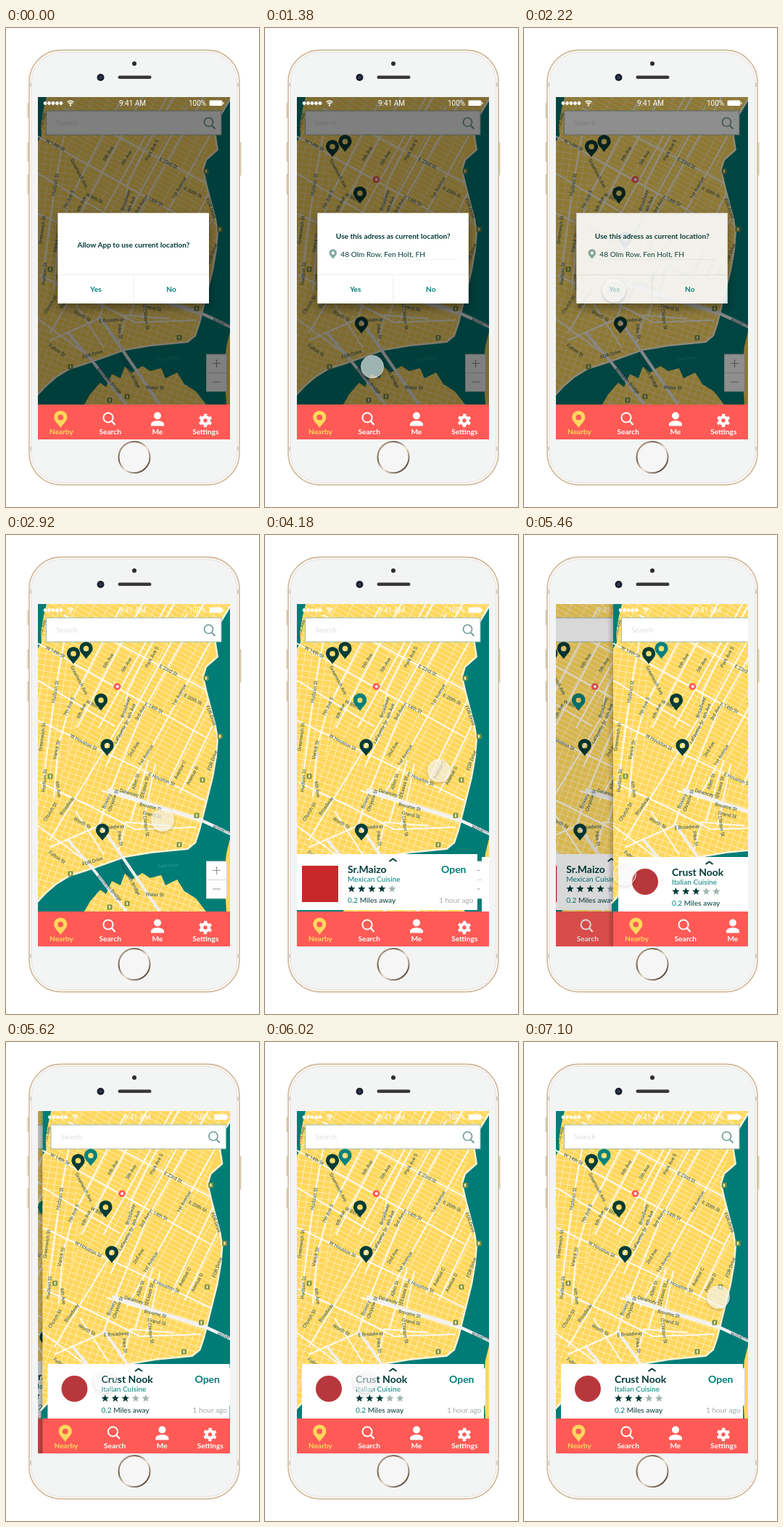
An HTML page that plays this animation: 349 by 659 pixels, repeating every 7.12 s.

```html
<!DOCTYPE html>
<html lang="en">
<head>
<meta charset="utf-8">
<title>Nearby food app</title>
<style>
  html, body { margin: 0; width: 100%; height: 100%; overflow: hidden; background: #fff; }
  svg { display: block; width: 100vw; height: 100vh; }
  text { font: 400 10.15px Lato, sans-serif; }
  .bold { font-weight: 700; }
  .title { font-weight: 700; font-size: 14px; }
  .mid { text-anchor: middle; }
  .street { font: 400 6.7px Roboto, sans-serif; fill: #27505a; text-anchor: middle; }
  .status { font: 400 10px Roboto, "Liberation Sans", sans-serif; fill: #fff; }
  .dark { fill: #003b38; }
  .teal { fill: #007f7a; }
  .road { fill: none; stroke: #fffaf0; stroke-linejoin: round; }
</style>
</head>
<body>
<svg id="stage" viewBox="0 0 349 659" xmlns="http://www.w3.org/2000/svg"></svg>
<script>
const LOOP = 7120;
const YELLOW = '#ffd75c', WATER = '#007c77', DARK = '#003b38', TEAL = '#00827d', RED = '#ff5a56';

const text = (x, y, s, cls = '', extra = '') => `<text x="${x}" y="${y}" class="${cls}" ${extra}>${s}</text>`;
const rect = (x, y, w, h, fill, extra = '') => `<rect x="${x}" y="${y}" width="${w}" height="${h}" fill="${fill}" ${extra}/>`;
const circle = (x, y, r, fill, extra = '') => `<circle cx="${x}" cy="${y}" r="${r}" fill="${fill}" ${extra}/>`;
const line = (d, stroke, width, extra = '') => `<path d="${d}" fill="none" stroke="${stroke}" stroke-width="${width}" ${extra}/>`;

const PIN = 'M0 14C-3 9-9.5 5-9.5-1A9.5 9.5 0 1 1 9.5-1C9.5 5 3 9 0 14ZM4-.8A4 4 0 1 0-4-.8A4 4 0 1 0 4-.8Z';
const pin = (x, y, fill, scale = 0.96) =>
  `<path d="${PIN}" fill="${fill}" fill-rule="evenodd" transform="translate(${x} ${y}) scale(${scale})"/>`;

const star = (x, y, fill) => {
  const points = Array.from({ length: 10 }, (_, i) => {
    const r = i % 2 ? 2.3 : 5.5, a = i * Math.PI / 5;
    return `${(x + r * Math.sin(a)).toFixed(1)},${(y - r * Math.cos(a)).toFixed(1)}`;
  });
  return `<polygon points="${points.join(' ')}" fill="${fill}"/>`;
};

// Map: land, water, street grids, main roads and labels
const SHORE = 'M310 99L296 122L290 148L293 168L277 182L273 195L278 217L284 240L290 262L293 281L291 305L286 334L275 378L268 406L262 424L251 433L200 438L164 444L136 454L110 463L88 470L70 481L56 493L42 508';
const BROOKLYN = 'M108 518L116 504L130 488L138 494L146 476L158 482L164 466L174 474L188 465L199 472L214 468L220 482L236 474L246 490L262 500L276 518Z';
const EAST_BANK = 'M309 418L304 438L301 468L304 518H309Z';
const LABELS = [
  ['11th Ave', 52, 130, -75], ['W 14th St', 67, 163, 27], ['Greenwich Ave', 99, 201, 62],
  ['6th Ave', 143, 174, -58], ['5th Ave', 168, 180, -58], ['7th Ave S', 89, 237, -66],
  ['6th Ave', 106, 243, -64], ['W 8th St', 121, 236, 26], ['Broadway', 167, 238, -72],
  ['4th Ave', 175, 243, -70], ['3rd Ave', 187, 246, -60], ['E 14th St', 203, 240, 24],
  ['Lafayette St', 161, 272, -60], ['W Houston St', 106, 287, 28], ['2nd Ave', 178, 296, -58],
  ['1st Avenue', 195, 304, -58], ['1st Avenue', 241, 221, -60], ['Park Ave S', 203, 169, -62],
  ['E 23rd St', 223, 188, 27], ['E 20th St', 257, 228, 27], ['Hudson St', 70, 216, -80],
  ['Greenwich St', 52, 278, -82], ['Varick St', 72, 296, -78], ['Hudson St', 55, 338, -84],
  ['6th Ave', 70, 350, 82], ['Broadway', 86, 374, -54], ['Church St', 63, 382, -58],
  ['Worth St', 104, 398, 30], ['Bowery', 141, 367, -66], ['Chrystie St', 150, 366, -70],
  ['Allen St', 181, 340, -72], ['Essex St', 194, 345, -75], ['E Houston St', 214, 338, 22],
  ['Avenue C', 242, 324, -62], ['Avenue D', 259, 332, -62], ['Delancey St', 173, 358, 16],
  ['Broome St', 199, 376, 14], ['Grand St', 201, 387, 14], ['Clinton St', 191, 401, 82],
  ['E Broadway', 146, 404, -4], ['Pike St', 155, 418, 82], ['FDR Drive', 120, 451, -17],
  ['FDR Drive', 281, 249, 70], ['FDR Drive', 287, 311, -70], ['Fulton St', 69, 445, 35],
  ['Water St', 205, 497, 3], ['Manhattan Bridge', 169, 473, 61], ['Brooklyn Bridge', 141, 487, 47],
  ['Williamsburg', 303, 409, 17]
];
const SHIELDS = [[276, 197], [295, 277], [271, 337], [263, 386], [239, 426], [89, 466], [143, 512], [167, 507], [61, 332]];
const MAIN_ROADS = [
  'M44 149L275 278M80 110L275 213M44 255L287 371M44 200L150 263',
  'M66 360L72 290L88 235L158 100M50 350L68 215L84 125',
  'M98 265L188 95M128 265L222 95M60 420L112 335L163 250L168 215L190 170L232 95',
  'M128 400L140 362L187 246L272 95M160 365L309 98M138 318L172 250L250 108',
  'M172 395L196 310M188 400L206 315M222 345L285 215M240 355L285 262',
  'M46 340L120 375L178 405L262 402M60 430L128 400M44 400L105 445M96 380L135 440',
  'M132 352L200 372L268 394M155 435L165 395L225 400'
];
const map = () => rect(44, 95, 265, 423, YELLOW)
  + '<path d="M44 95H310L272 180L290 260L287 371L95 279L88 174L44 149Z" fill="url(#gridNorth)"/>'
  + '<path d="M44 149L88 174L95 279L60 360L44 350Z" fill="url(#gridWest)"/>'
  + '<path d="M95 279L287 371L262 430L110 465L44 510V350L60 360Z" fill="url(#gridSouth)"/>'
  + `<path d="M44 95H56L52 111L48 133L49 148L44 156Z" fill="${WATER}"/>`
  + `<path d="${MAIN_ROADS.join('')}" class="road" stroke-width="2"/>`
  + `<path d="${SHORE}" class="road" stroke-width="5" opacity=".8"/>`
  + `<path d="${SHORE}V520H312Z" fill="${WATER}"/>`
  + `<path d="${BROOKLYN}${EAST_BANK}" fill="${YELLOW}"/><path d="${BROOKLYN}" fill="url(#gridSouth)"/>`
  + line('M140 350L205 372L264 390L312 412', '#f2f2f2', 4.5)
  + line('M128 396L160 442L212 518M86 420L122 462L166 518', '#f0f0ee', 4)
  + SHIELDS.map(([x, y]) => rect(x - 3.5, y - 3.5, 7, 7, '#7f9440', 'rx="1"') + rect(x - 1, y - 2, 2, 4, '#e9edc8')).join('')
  + LABELS.map(([s, x, y, a]) => text(0, 0, s, 'street', `transform="translate(${x} ${y}) rotate(${a})"`)).join('')
  + text(0, 0, 'East River', 'street', 'transform="translate(224 457) rotate(-5)" style="fill:#2c9a94;font-style:italic"');

const marker = `<path d="M148 208.5L151 204H156L159 208.5L156 213H151Z" fill="${RED}"/>` + circle(153.7, 208.5, 2, '#fff');

const controls = rect(55.5, 114, 241.5, 33, '#fff', 'stroke="#9fb7b2" stroke-width="1"')
  + text(69, 134, 'Search', '', 'fill="#dcdfdf"')
  + line('M284 134.5L288.5 138.7', '#6f9c97', 2) + circle(279.5, 129.5, 6, 'none', 'stroke="#6f9c97" stroke-width="1.7"')
  + rect(276.5, 449, 28, 51, '#fff', 'stroke="#d3d6d2" stroke-width="1"')
  + line('M277 474.5H304', '#d3d6d2', 1)
  + line('M285 461.5H296M290.5 456V467M285 487H296', '#8f9692', 1.2);

const status = [54, 59.5, 65, 70.5, 76].map(x => circle(x, 103.5, 2.4, '#fff')).join('')
  + line('M84.5 102Q89 98.5 93.5 102M86.3 104.3Q89 102 91.7 104.3', '#fff', 1.5) + circle(89, 106.2, 1.2, '#fff')
  + text(174.5, 107, '9:41 AM', 'status mid') + text(264, 107, '100%', 'status mid')
  + rect(280.5, 99.5, 18, 7.5, '#fff', 'rx="1.5"') + rect(299.2, 102, 1.2, 3, '#fff');

const tabBar = rect(44, 518, 265, 48, RED)
  + pin(75.3, 536.5, YELLOW)
  + circle(141, 536, 6.6, 'none', 'stroke="#fff" stroke-width="2"') + line('M146 541L150.5 546', '#fff', 2.4)
  + circle(209, 533.5, 5, '#fff') + '<path d="M200 547.5V545C200 538.5 218 538.5 218 545V547.5Z" fill="#fff"/>'
  + circle(275, 540, 4.9, 'none', 'stroke="#fff" stroke-width="4.4"')
  + circle(275, 540, 7.6, 'none', 'stroke="#fff" stroke-width="3.4" stroke-dasharray="3.98 3.98" transform="rotate(15 275 540)"')
  + [['Nearby', 76.5, YELLOW], ['Search', 143.7, '#fff'], ['Me', 208.8, '#fff'], ['Settings', 275.3, '#fff']]
    .map(([s, x, c]) => text(x, 559, s, 'bold mid', `fill="${c}"`)).join('');

const card = (name, cuisine, stars) => text(114, 465, name, 'title dark')
  + text(243, 465, 'Open', 'title teal') + text(114, 477, cuisine, 'teal')
  + [0, 1, 2, 3, 4].map(i => star(119.3 + i * 14, 487, i < stars ? DARK : '#9fb3b0')).join('')
  + '<text x="114" y="506" class="dark"><tspan class="teal">0.2</tspan> Miles away</text>'
  + text(240, 506, '1 hour ago', '', 'fill="#a3aaa9"');
const caret = y => line(`M171.5 ${y + 2}L176.5 ${y - 1.5}L181.5 ${y + 2}`, DARK, 2);

const tacoCard = rect(44, 439, 249, 77, '#fff') + rect(299, 443, 10, 75, '#fff')
  + caret(447) + rect(51, 455, 50, 50, '#c9282b') + card('Sr.Maizo', 'Mexican Cuisine', 4);
const pizzaCard = rect(51, 443, 251, 75, '#fff') + caret(451) + circle(88, 477, 18, '#b8373c')
  + `<g transform="translate(11 3.5)">${card('Crust Nook', 'Italian Cuisine', 3)}</g>`;

const dialog = (id, x, body) => `<g id="${id}" transform="translate(${x} 0)">`
  + rect(71.5, 254.5, 208.5, 124.5, '#fff', 'filter="url(#soft)"')
  + line('M71.5 339.5H280M176 339.5V379', '#e9eeed', 1)
  + body + text(124, 363, 'Yes', 'bold mid teal') + text(228, 363, 'No', 'bold mid teal') + '</g>';

const sideButton = (x, y, h) => rect(x, y, 3, h, '#dcc8ae', 'rx="1"');
const phone = sideButton(29.5, 103, 21) + sideButton(29.5, 157, 27) + sideButton(29.5, 201, 28) + sideButton(321.5, 157, 46)
  + rect(32, 30.5, 290, 598, '#fff', 'rx="44" stroke="#d3bea2" stroke-width="1.8"')
  + rect(35, 33.5, 284, 592, '#f3f4f4', 'rx="41" stroke="#e6dfd5" stroke-width="1"')
  + [[32, 75], [319, 75], [32, 576], [319, 576]].map(([x, y]) => rect(x, y, 3, 6, '#d3d0cb')).join('')
  + circle(177, 49, 3, '#2c2c32') + circle(130.5, 68, 5, '#1c1f2a') + circle(130.5, 68, 2, '#2c3f63')
  + rect(154.5, 65.5, 46, 4.5, '#38383a', 'rx="2.2"')
  + circle(177, 590.5, 21.5, '#f6f6f6', 'stroke="url(#gold)" stroke-width="2"');

const grid = (id, w, h, angle) => `<pattern id="${id}" width="${w}" height="${h}" patternUnits="userSpaceOnUse" patternTransform="rotate(${angle})">`
  + line(`M0 .5H${w}M.5 0V${h}`, '#fff0bd', 0.85) + '</pattern>';

document.getElementById('stage').innerHTML = `
<defs>
  <clipPath id="screen"><rect x="44" y="95" width="265" height="471"/></clipPath>
  <filter id="soft" x="-20%" y="-20%" width="140%" height="150%"><feDropShadow dx="0" dy="6" stdDeviation="7" flood-opacity=".4"/></filter>
  <filter id="lift" x="-40%" y="-40%" width="180%" height="190%"><feDropShadow dx="0" dy="2" stdDeviation="2" flood-opacity=".3"/></filter>
  <linearGradient id="gold" x2="1" y2="1"><stop stop-color="#d8c8b2"/><stop offset=".3" stop-color="#6f5c48"/><stop offset=".55" stop-color="#efe3d2"/><stop offset=".85" stop-color="#5f4e3d"/><stop offset="1" stop-color="#b89a70"/></linearGradient>
  <linearGradient id="edge"><stop stop-opacity="0"/><stop offset="1" stop-opacity=".2"/></linearGradient>
  ${grid('gridNorth', 19, 6.6, 28.5)}${grid('gridWest', 10, 8, 9)}${grid('gridSouth', 9, 8, 19)}
  <g id="map">${map()}</g>
</defs>
${phone}
<g clip-path="url(#screen)">
  <g id="first">
    <use href="#map"/>
    ${controls}
    <g id="pins">${marker}${pin(93, 164, DARK)}${pin(110.5, 157, DARK)}${pin(139.5, 290.5, DARK)}${pin(133, 407, DARK)}${pin(131, 228, DARK)}</g>
    <g id="picked">${pin(131, 228, TEAL)}</g>
    <g id="taco">${tacoCard}</g>
    <rect id="dim" x="44" y="95" width="265" height="423"/>
    ${status}
    ${dialog('ask', 0, text(176, 302, 'Allow App to use current location?', 'bold mid dark'))}
    ${dialog('confirm', 0.8, text(176, 290, 'Use this adress as current location?', 'bold mid dark')
      + pin(93, 310, '#7fa8a4', 0.55) + text(103.5, 315, '48 Olm Row. Fen Holt, FH', 'dark') + line('M103 318.5H266', '#eef1f0', 0.7))}
    ${tabBar}
  </g>
  <rect id="shade" x="44" y="95" width="265" height="471"/>
  <g id="second">
    ${rect(36, 95, 8, 471, 'url(#edge)')}
    <use href="#map"/>
    ${controls}
    ${marker}${pin(110.5, 157, TEAL)}${pin(93, 164, DARK)}${pin(131, 228, DARK)}${pin(139.5, 290.5, DARK)}
    ${pizzaCard}${status}${tabBar}
  </g>
  <g id="touch" filter="url(#lift)">
    <circle id="fingertip" r="15.5" fill="#fff" stroke="#fff"/>
  </g>
</g>`;

const el = Object.fromEntries([...document.querySelectorAll('[id]')].map(n => [n.id, n]));
const clamp = v => Math.max(0, Math.min(1, v));
const ease = u => u < 0.5 ? 2 * u * u : 1 - 2 * (1 - u) ** 2;
const ramp = (t, start, length) => ease(clamp((t - start) / length));
const set = (node, name, value) => node.setAttribute(name, value);

// time, x, y, opacity of the touch point
const PATH = [
  [150, 190, 500, 0], [350, 180, 480, 1], [700, 124, 361, 1], [860, 124, 361, 1],
  [1250, 148, 466, 1], [1450, 148, 466, 1], [1950, 124, 361, 1], [2200, 124, 361, 1],
  [2750, 216, 392, 1], [2950, 216, 392, 1], [3400, 131, 230, 1], [3620, 131, 230, 1],
  [4080, 240, 324, 1], [4260, 240, 324, 1], [4850, 141, 466, 1], [5300, 141, 466, 1],
  [5620, 137, 467, 1], [6000, 137, 467, 1], [6700, 268, 351, 1]
];
const TAPS = [780, 2080, 3510, 4980];

function touchAt(t) {
  const next = PATH.findIndex(k => k[0] > t);
  if (next < 0) return PATH[PATH.length - 1];
  if (next === 0) return PATH[0];
  const a = PATH[next - 1], b = PATH[next], u = ramp(t, a[0], b[0] - a[0]);
  return a.map((v, i) => v + (b[i] - v) * u);
}

function draw(t) {
  const swap = ramp(t, 860, 200), close = ramp(t, 2160, 260);
  const push = ramp(t, 5105, 580);
  set(el.ask, 'opacity', 1 - swap);
  set(el.confirm, 'opacity', swap * (1 - close));
  set(el.pins, 'opacity', swap);
  set(el.dim, 'opacity', 0.5 * (1 - close));
  set(el.picked, 'opacity', ramp(t, 3560, 120));
  set(el.taco, 'transform', `translate(0 ${80 * (1 - ramp(t, 3580, 340))})`);
  set(el.first, 'transform', `translate(${-79.5 * push} 0)`);
  set(el.shade, 'opacity', 0.22 * push);
  set(el.second, 'transform', `translate(${265 * (1 - push)} 0)`);
  set(el.second, 'visibility', push > 0 ? 'visible' : 'hidden');

  const [, x, y, opacity] = touchAt(t);
  const press = Math.max(...TAPS.map(at => clamp(1 - Math.abs(t - at) / 110)));
  const faint = ramp(t, 5000, 200) * (1 - ramp(t, 5800, 300));
  set(el.touch, 'transform', `translate(${x} ${y}) scale(${1 - 0.18 * press})`);
  set(el.touch, 'opacity', opacity);
  set(el.fingertip, 'fill-opacity', 0.58 - 0.4 * faint);
  set(el.fingertip, 'stroke-opacity', 0.5 + 0.4 * faint);
}

const begin = performance.now();
function tick() {
  draw((performance.now() - begin) % LOOP);
  requestAnimationFrame(tick);
}
tick();
</script>
</body>
</html>
```
